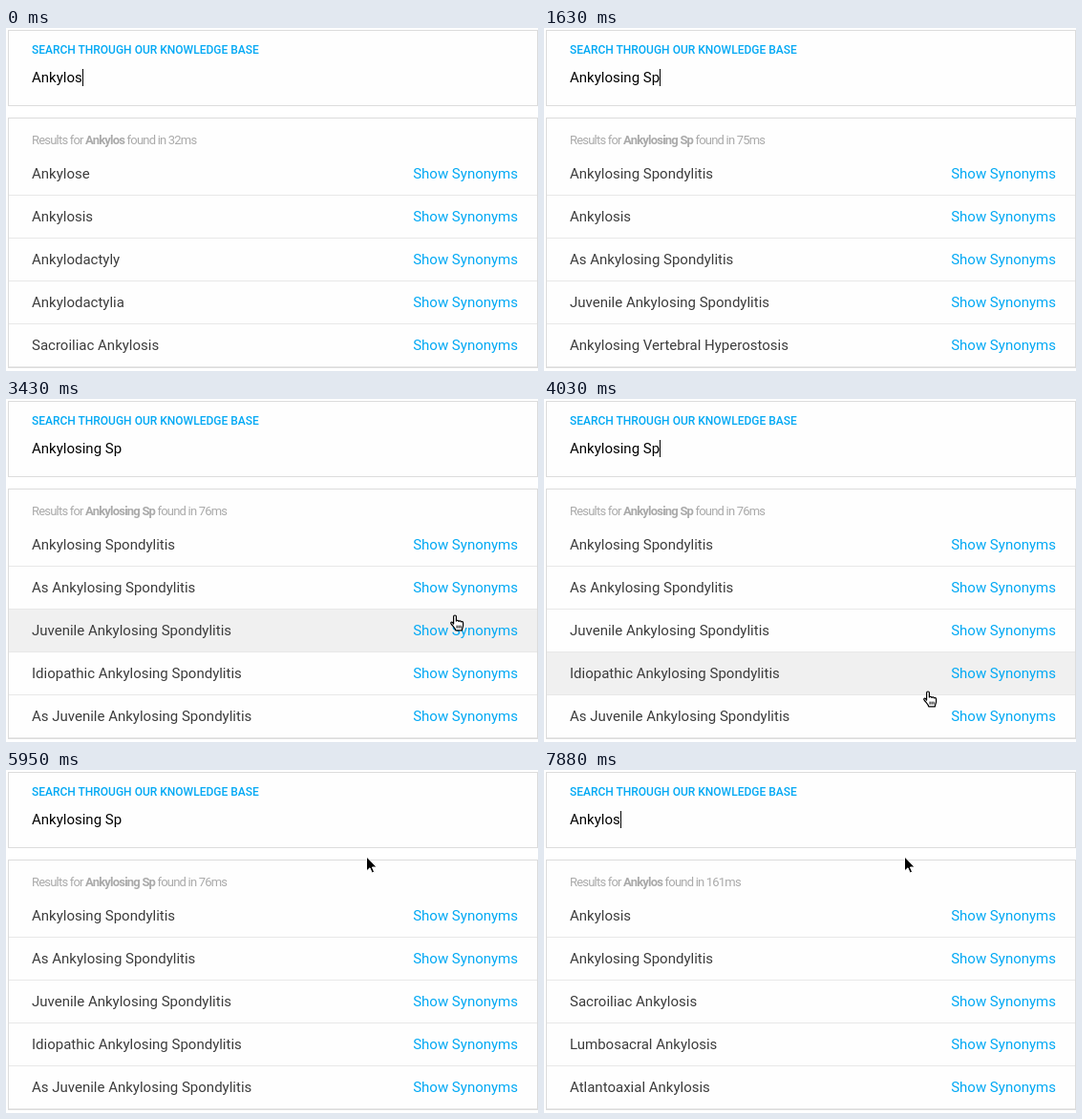
Animation, 557 px wide and 360 px high, one loop 8000 ms. Source, as an HTML page:

```html
<!DOCTYPE html>
<html lang="en">
<head>
<meta charset="utf-8">
<title>Knowledge base search</title>
<style>
  html, body { margin: 0; width: 100%; height: 100%; overflow: hidden; background: #fff; }
  body { position: relative; font: 15px/18px Roboto, sans-serif; color: #3c3c3c; }
  .card {
    position: absolute; left: 2px; width: 555px; box-sizing: border-box;
    border: 1px solid #dcdcdc; background: #fefefe;
  }
  #search { top: 2px; height: 80px; }
  #results { top: 94px; height: 263px; }
  h1, #query, #summary { position: absolute; left: 24px; margin: 0; white-space: nowrap; }
  h1 { top: 13px; font-size: 12px; line-height: 14px; font-weight: 500; color: #03a9f4; }
  #query { top: 40px; white-space: pre; color: #000; }
  #caret { display: inline-block; width: 1px; height: 18px; background: #000; vertical-align: top; }
  #summary { top: 15px; font-size: 13px; line-height: 15px; letter-spacing: -.8px; color: #aaa; }
  #list { position: absolute; top: 36px; left: 0; right: 0; }
  .row {
    display: flex; justify-content: space-between; height: 44px; line-height: 44px;
    padding: 0 20px 0 24px; border-bottom: 1px solid #e8e8e8;
  }
  .row.hover { background: #f0f0f0; }
  .row a { color: #03a9f4; }
  svg { position: absolute; left: 0; top: 0; width: 18px; height: 20px; overflow: visible; }
</style>
</head>
<body>
<div class="card" id="search">
  <h1>SEARCH THROUGH OUR KNOWLEDGE BASE</h1>
  <div id="query"><span id="typed"></span><i id="caret"></i></div>
</div>
<div class="card" id="results">
  <div id="summary">Results for <b id="term"></b> found in <span id="ms"></span>ms</div>
  <div id="list"></div>
</div>
<svg id="hand">
  <path transform="translate(-5.4 -.9)" fill="#fff" stroke="#000" stroke-width="1.2" stroke-linejoin="round"
    d="M4 10V2.3a1.4 1.4 0 0 1 2.8 0V7c0-1 2.4-1 2.6.3c.5-.9 2.3-.7 2.5.5c.6-.6 2.1-.3 2.1 1V11.5c0 2-1.2 3-1.2 5.2H6.2C5.7 14.4 3.6 12.6 1.6 10C.4 8.6 1.8 7.4 2.9 8.3Z"/>
  <path transform="translate(-5.4 -.9)" stroke="#000" d="M7.5 11.5v3M9.5 11.5v3M11.5 11.5v3"/>
</svg>
<svg id="arrow">
  <path fill="#000" stroke="#fff" stroke-width="1" d="M-.5-1V14L3 10.8L5.2 16L7.6 15L5.4 10H10.2Z"/>
</svg>
<script>
const LOOP = 8000, TICK = 148.7;
const $ = id => document.getElementById(id);

const lists = {
  stem: ['Ankylose', 'Ankylosis', 'Ankylodactyly', 'Ankylodactylia', 'Sacroiliac Ankylosis'],
  joints: ['Ankylosis', 'Ankylosing Spondylitis', 'Sacroiliac Ankylosis', 'Lumbosacral Ankylosis', 'Atlantoaxial Ankylosis'],
  mixed: ['Ankylosing Spondylitis', 'Ankylosis', 'As Ankylosing Spondylitis', 'Juvenile Ankylosing Spondylitis', 'Ankylosing Vertebral Hyperostosis'],
  spine: ['Ankylosing Spondylitis', 'As Ankylosing Spondylitis', 'Juvenile Ankylosing Spondylitis', 'Idiopathic Ankylosing Spondylitis', 'As Juvenile Ankylosing Spondylitis']
};

const full = 'Ankylosing Sp';
// [time, typed characters]
const typing = [[0, 7], [140, 8], [740, 9], [1030, 10], [1330, 11], [1480, 12], [1630, 13],
  [6700, 12], [7000, 11], [7140, 10], [7290, 9], [7740, 8], [7880, 7]];
// [time, list, search duration]
const answers = [[0, 'stem', 32], [290, 'joints', 38], [1180, 'mixed', 75], [1780, 'spine', 76], [7590, 'joints', 161]];
const caretOff = [[2230, 2830], [3430, 4030], [4480, 5070], [5660, 6250]];
// [tick, x, y]
const path = [[19, 531, 158], [25, 440, 262], [27, 402, 307], [29, 384, 328], [31, 376, 340],
  [33, 374, 334], [34, 376, 294], [38, 377, 140], [40, 378, 92]];

const rows = lists.stem.map(() => {
  const row = document.createElement('div');
  row.className = 'row';
  row.innerHTML = '<span></span><a>Show Synonyms</a>';
  return $('list').appendChild(row);
});

const current = (steps, t) => steps.filter(s => s[0] <= t).pop();

function pointerAt(tick) {
  if (tick < path[0][0]) return null;
  const next = path.findIndex(p => p[0] > tick);
  if (next < 0) return path[path.length - 1].slice(1);
  const [a, b] = [path[next - 1], path[next]];
  const k = (tick - a[0]) / (b[0] - a[0]);
  return [1, 2].map(i => Math.round(a[i] + (b[i] - a[i]) * k));
}

function place(el, visible, pos) {
  el.style.display = visible ? 'block' : 'none';
  if (visible) el.style.transform = `translate(${pos[0]}px, ${pos[1]}px)`;
}

function draw(now) {
  const t = now % LOOP;
  const text = full.slice(0, current(typing, t)[1]);
  const [, name, ms] = current(answers, t);
  $('typed').textContent = $('term').textContent = text;
  $('ms').textContent = ms;
  $('caret').style.opacity = caretOff.some(([a, b]) => t >= a && t < b) ? 0 : 1;

  const pos = pointerAt(Math.floor((t + 11) / TICK));
  const hovered = pos ? Math.floor((pos[1] - 131) / 45) : -1;
  rows.forEach((row, i) => {
    row.firstChild.textContent = lists[name][i];
    row.classList.toggle('hover', i === hovered);
  });
  place($('hand'), pos && hovered >= 0, pos);
  place($('arrow'), pos && hovered < 0, pos);
  requestAnimationFrame(draw);
}
draw(0);
</script>
</body>
</html>
```
